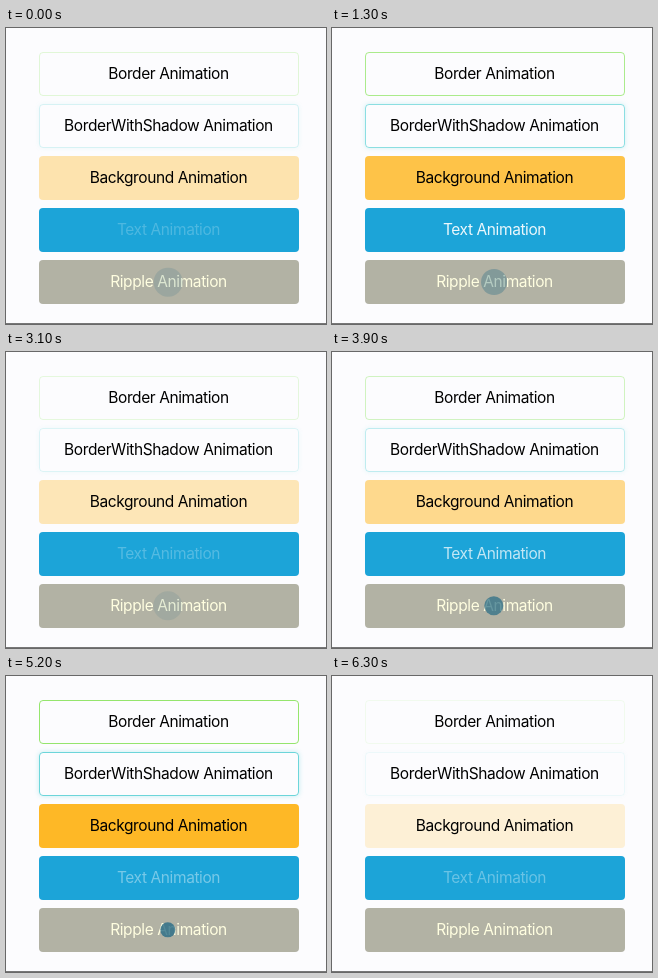
Animation, 320 px wide and 296 px high, one loop 6400 ms. Source, as an HTML page:

```html
<!DOCTYPE html>
<html lang="en">
<head>
<meta charset="utf-8">
<title>Button animations</title>
<style>
  html, body { margin: 0; width: 100%; height: 100%; overflow: hidden; background: #fcfcfe; }
  #stage { position: relative; width: 320px; height: 296px; overflow: hidden; }
  #stage::after { content: ""; position: absolute; left: 0; top: 295px; width: 100%; height: 1px; background: #777; }
  .button {
    position: absolute; left: 33px; width: 260px; height: 43.5px;
    box-sizing: border-box; border-radius: 4px; padding-right: 1px;
    font: 15.5px/44.5px Inter, "Open Sans", sans-serif; letter-spacing: -.4px;
    text-align: center; white-space: nowrap; color: #000;
  }
  #border, #shadow { border: 1px solid transparent; line-height: 42.5px; }
  #border { top: 24px; }
  #shadow { top: 76px; }
  #fill { top: 128px; }
  #text { top: 180px; background: #1ca4d8; }
  #ripple { top: 232px; background: #b2b2a4; color: #fffee0; }
  #wave {
    position: absolute; left: 162px; top: 254px; border-radius: 50%;
    transform: translate(-50%, -50%); background: #286c86;
  }
</style>
</head>
<body>
<div id="stage">
  <div class="button" id="border">Border Animation</div>
  <div class="button" id="shadow">BorderWithShadow Animation</div>
  <div class="button" id="fill">Background Animation</div>
  <div class="button" id="text">Text Animation</div>
  <div class="button" id="ripple">Ripple Animation</div>
  <div id="wave"></div>
</div>
<script>
const LOOP = 6400, STEP = 100, HALF = 1525;
const style = id => document.getElementById(id).style;
const border = style("border"), shadow = style("shadow"), fill = style("fill"),
      text = style("text"), wave = style("wave");

const cycle = (t, length) => ((t % length) + length) % length / length;

// Goes 0 -> 1 -> 0 over two halves, lowest at time `low`
const pulse = (t, low) => 1 - Math.abs(1 - 2 * cycle(t - low, 2 * HALF));

function draw(t) {
  const glow = pulse(t, 330);
  border.borderColor = `rgba(125, 225, 75, ${glow})`;
  shadow.borderColor = `rgba(75, 205, 210, ${glow})`;
  shadow.boxShadow = `0 0 5px rgba(75, 205, 210, ${glow * 0.4})`;
  fill.background = `rgba(255, 173, 0, ${glow ** 0.75})`;

  text.color = `rgba(255, 255, 255, ${0.04 + 0.92 * pulse(t, 2750)})`;

  const u = cycle(t - 200, HALF);
  wave.width = wave.height = 31 * u ** 0.55 + "px";
  wave.opacity = Math.min(0.8, 1.25 * (1 - u));
}

const start = performance.now();
function frame() {
  const t = (performance.now() - start) % LOOP;
  draw(Math.floor(t / STEP) * STEP);
  requestAnimationFrame(frame);
}
frame();
</script>
</body>
</html>
```
